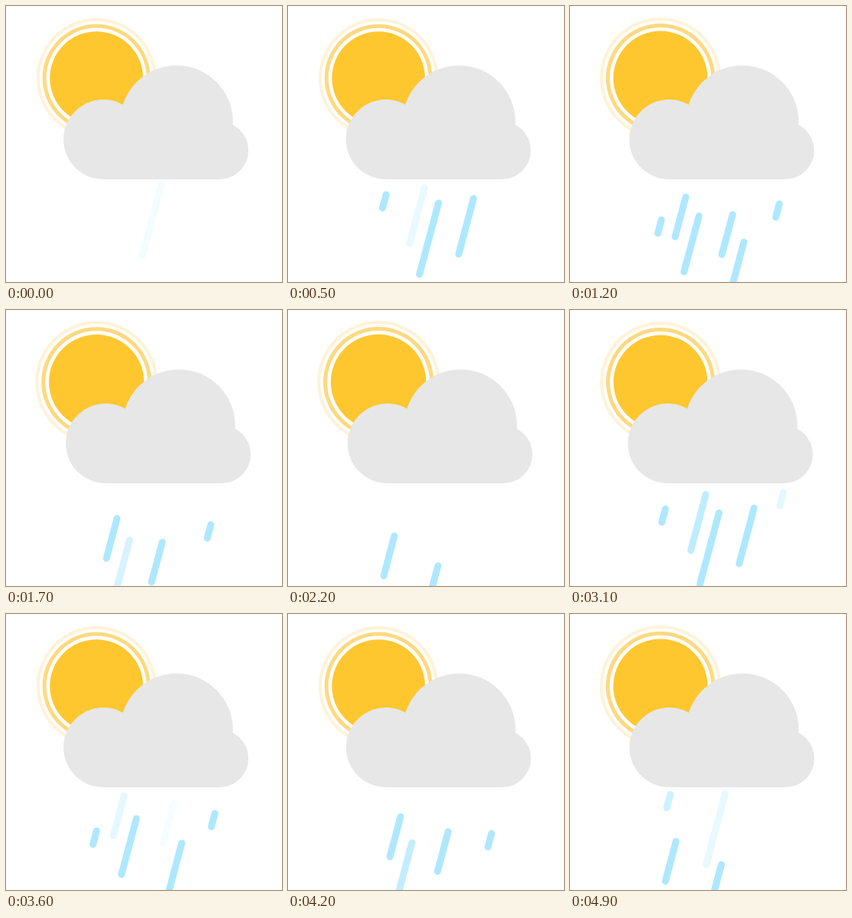
Animation, 360 px wide and 360 px high, one loop 5000 ms. Source, as an HTML page with a canvas:

```html
<!DOCTYPE html>
<html lang="en">
<head>
<meta charset="utf-8">
<title>Sun, cloud and rain</title>
<style>
  html, body { margin: 0; width: 100%; height: 100%; overflow: hidden; background: #fff; }
  canvas { display: block; width: 360px; height: 360px; }
</style>
</head>
<body>
<canvas id="stage" width="360" height="360"></canvas>
<script>
const ctx = document.getElementById('stage').getContext('2d');
const LOOP = 5000, STEP = 100, SWAY = 3600, FADE = 130, SLANT = 0.267;

// x, y: upper end at birth; h: height; speed in px/s; the rest in ms
const drops = [
  { x: 203,   y: 232,   h: 93,   speed: 48,   start: -20, period: 2442, life: 1100 },
  { x: 131.9, y: 231.5, h: 17.5, speed: 47,   start: 190, period: 2315, life: 1300 },
  { x: 178.5, y: 235.2, h: 73,   speed: 52.5, start: 465, period: 2533, life: 1300 },
  { x: 246.3, y: 235,   h: 72.5, speed: 81,   start: 300, period: 2511, life: 1200 },
  { x: 154.6, y: 235.4, h: 52,   speed: 45.6, start: 900, period: 2660, life: 1850 },
  { x: 219,   y: 246,   h: 52,   speed: 61.5, start: 775, period: 2810, life: 1850 },
  { x: 278.9, y: 236,   h: 17.5, speed: 44,   start: 700, period: 2355, life: 1300 }
];

// Smooth 0..1..0 swing
const swing = t => (1 - Math.cos(2 * Math.PI * t / SWAY)) / 2;

function disc(x, y, r, color) {
  ctx.fillStyle = color;
  ctx.beginPath();
  ctx.arc(x, y, r, 0, 2 * Math.PI);
  ctx.fill();
}

function drawSun(t) {
  const k = 1 + 0.025 * swing(t - 300);
  const layers = [
    [78, '#fef3d8'], [74, '#fff'],
    [70.3, '#fed980'], [65.3, '#fff'],
    [60.7, '#ffc72f']
  ];
  for (const [r, color] of layers) disc(118, 94, r * k, color);
}

function drawCloud(t) {
  const dx = 3 * swing(t), gray = '#e7e7e7';
  disc(127 + dx, 174, 52, gray);
  disc(222.5 + dx, 151, 73.5, gray);
  disc(278.5 + dx, 188.3, 37.7, gray);
  ctx.fillRect(127 + dx, 174, 151.5, 52);
}

function drawDrop(d, t) {
  if (t < d.start) return;
  const age = (t - d.start) % d.period;
  if (age >= d.life) return;
  const fall = d.speed * age / 1000;
  const x = d.x - fall * SLANT, y = d.y + fall;
  ctx.globalAlpha = Math.min(1, age / FADE, (d.life - age) / FADE);
  ctx.beginPath();
  ctx.moveTo(x, y);
  ctx.lineTo(x - d.h * SLANT, y + d.h);
  ctx.stroke();
  ctx.globalAlpha = 1;
}

function draw(now) {
  const t = Math.floor((now % LOOP) / STEP) * STEP;
  ctx.fillStyle = '#fff';
  ctx.fillRect(0, 0, 360, 360);
  drawSun(t);
  ctx.strokeStyle = '#aee8ff';
  ctx.lineWidth = 9;
  ctx.lineCap = 'round';
  for (const d of drops) drawDrop(d, t);
  drawCloud(t);
}

let begin;
function tick(now) {
  begin ??= now;
  draw(now - begin);
  requestAnimationFrame(tick);
}
draw(0);
requestAnimationFrame(tick);
</script>
</body>
</html>
```
